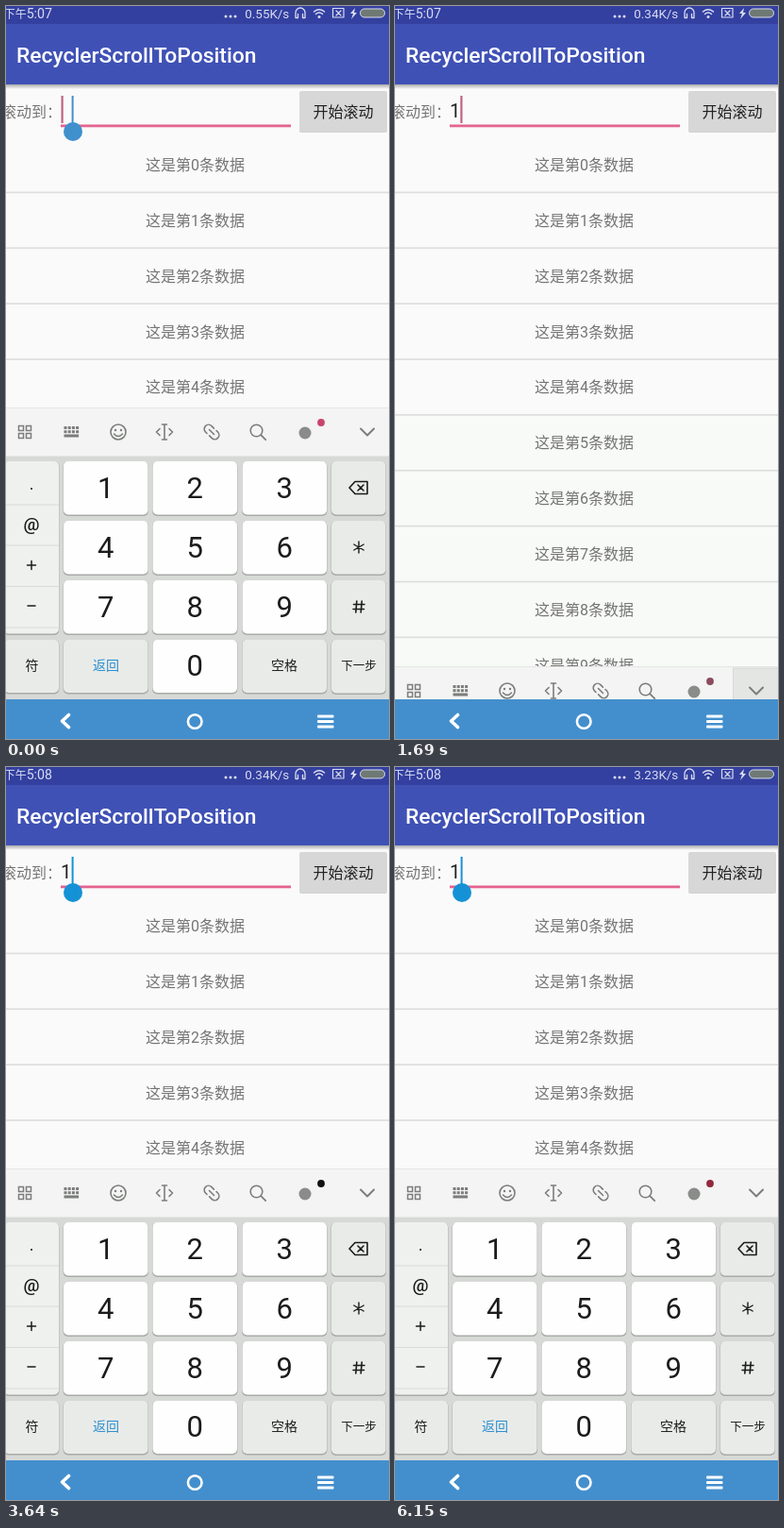
These frames come from a looping animation (406x776 px, 6230 ms). An HTML page:

```html
<!DOCTYPE html>
<html lang="zh">
<head>
<meta charset="utf-8">
<style>
html, body { margin: 0; width: 100%; height: 100%; overflow: hidden; background: #fafafa; }
svg { display: block; width: 406px; height: 776px; font-family: Roboto, 'Noto Sans CJK SC', 'Noto Sans CJK JP', 'Noto Sans CJK', sans-serif; }
.line { fill: none; stroke-linecap: round; stroke-linejoin: round; }
</style>
</head>
<body>
<svg id="stage" viewBox="0 0 406 776"></svg>
<script>
const LOOP = 6230, TYPED = 400, HIDE = 1440, TAP = 3330, KEYBOARD = 309;

const rect = (x, y, w, h, fill, extra = '') =>
  `<rect x="${x}" y="${y}" width="${w}" height="${h}" fill="${fill}" ${extra}/>`;
const text = (x, y, size, fill, s, extra = 'text-anchor="middle"') =>
  `<text x="${x}" y="${y}" font-size="${size}" fill="${fill}" ${extra}>${s}</text>`;
const line = (d, color, width = 1.6, extra = '') =>
  `<path class="line" d="${d}" stroke="${color}" stroke-width="${width}" ${extra}/>`;
const circle = (x, y, r, fill, extra = '') =>
  `<circle cx="${x}" cy="${y}" r="${r}" fill="${fill}" ${extra}/>`;
const range = (n, f) => Array.from({ length: n }, (_, i) => f(i)).join('');

function key(x, y, w, h, fill) {
  return rect(x - 0.4, y + 0.4, w + 0.8, h + 1, '#a9aba9', 'rx="5"') + rect(x, y, w, h, fill, 'rx="5"');
}

function list() {
  return range(10, i =>
    text(200.5, 174 + 58.85 * i, 16, '#757575', `这是第${i}条数据`) +
    rect(0, 196.6 + 58.87 * i, 406, 1.6, '#dcdddc'));
}

function header() {
  const pale = '#d9dcf0';
  return rect(0, 83, 406, 5, 'url(#shade)') +
    rect(0, 0, 406, 19, '#3340a0') + rect(0, 19, 406, 64, '#3f51b5') +
    text(11, 60, 22.85, '#fff', 'RecyclerScrollToPosition', 'font-weight="500"') +
    text(49, 13, 14.2, pale, '<tspan font-size="12">下午</tspan><tspan id="clock"></tspan>', 'text-anchor="end"') +
    range(3, i => circle(233 + 5 * i, 11, 1.5, pale)) +
    text(253.3, 13, 13.4, pale, '', 'id="speed"') +
    line('M309.500 8.500v4h-2.500V7a5 5 0 0 1 10 0v5.500h-2.500v-4', pale, 1.3) +
    line('M326.500 6q5.500-4.500 11 0M328.500 8.500q3.500-2.800 7 0', pale, 1.5) + circle(332, 11.5, 1.5, pale) +
    line('M346.500 2.500H358V12H346.500ZM350 5l5 5M355 5l-5 5', pale, 1.2) +
    `<path d="M370 2l-5 6h3l-2 6 6-7h-3z" fill="${pale}"/>` +
    rect(375.5, 3, 26, 9, '#6f7974', `rx="4.500" stroke="${pale}"`);
}

function form() {
  return text(-5, 118, 16, '#757575', '滚动到：', '') +
    rect(58, 125.5, 244, 2.8, '#e4638f') +
    text(58, 118, 20.3, '#222', '1', 'id="digit"') +
    rect(58.5, 95, 2.2, 29, '#bf6284', 'id="caret"') +
    `<g id="handle">${rect(69.6, 95, 2, 30, 'currentColor')}${circle(71, 133, 10, 'currentColor')}</g>` +
    rect(311, 91.5, 93, 42.5, '#bfc0bf', 'rx="2" opacity=".7"') +
    rect(311, 90, 93, 43, '#d6d7d6', 'id="button" rx="2"') +
    text(357.5, 118, 16, '#212121', '开始滚动');
}

function toolbar() {
  const c = '#7b7d7b';
  return rect(0, 425, 406, 52, '#f3f4f3') + rect(0, 425, 406, 1, '#e5e7e5') +
    rect(358.5, 427, 49, 50, '#e4e6e4', 'id="press" stroke="#d6d8d6"') +
    range(4, i => rect(13.5 + 8 * (i % 2), 444.5 + 8 * (i >> 1), 5, 5, 'none', `stroke="${c}" stroke-width="1.5"`)) +
    range(8, i => rect(61.5 + 4.2 * (i % 4), 445 + 4.2 * (i >> 2), 3, 3, c)) + rect(61.5, 453.5, 15.6, 3, c) +
    circle(119, 451, 8, 'none', `stroke="${c}" stroke-width="1.6"`) +
    circle(116, 449, 1.2, c) + circle(122, 449, 1.2, c) + line('M114.500 453q4.500 5 9 0', c, 1.5) +
    line('M165.500 443h5M168 443v16M165.500 459h5M163 447.500l-3.500 3.500 3.500 3.500M173 447.500l3.500 3.500-3.500 3.500', c) +
    line('M213 452.500l-1.500-1.500a4.500 4.500 0 0 1 6.400-6.400l2.500 2.500M223 449.500l1.500 1.500a4.500 4.500 0 0 1-6.400 6.400l-2.500-2.500M215.500 448.500l5 5', c) +
    circle(265.5, 449.5, 6.3, 'none', `stroke="${c}" stroke-width="1.6"`) + line('M270.200 454.200l5 5', c, 1.8) +
    circle(317, 452, 6.5, '#8a8c8a') + circle(334, 441, 3.9, '#111', 'id="dot"') +
    line('M376 447.500l7 7 7-7', c, 2);
}

function keys() {
  const ink = '#1a1c1a', soft = '#e9ebe9', white = '#fefefe';
  const xs = [61, 155.5, 250.5], rowY = r => 482 + 63 * r;
  let s = rect(0, 476.5, 406, 258, '#d7d9d7') + key(-2, 482, 58, 182.5, '#eff1ef') +
    [527.5, 570.5, 614, 657.5].map(y => rect(0, y, 56, 1, '#d9dbd9')).join('') +
    text(27, 512, 18, ink, '.') + text(27, 555, 19, ink, '@', 'text-anchor="middle" font-weight="500"') +
    line('M22.500 592h9M27 587.500v9M23 635h8', ink, 1.5);
  s += range(9, i => {
    const x = xs[i % 3], y = rowY(Math.floor(i / 3));
    return key(x, y, 89.5, 56.5, white) + text(x + 44.7, y + 38.5, 31, ink, i + 1);
  });
  s += range(4, r => key(345, rowY(r), 57.5, 56.5, soft));
  s += key(-2, 671, 58, 56, soft) + key(61, 671, 89.5, 56, soft) +
    key(155.5, 671, 89.5, 56, white) + key(250.5, 671, 89.5, 56, soft) +
    text(27.5, 703, 14, ink, '符') + text(106, 703, 14, '#2b8fce', '返回') +
    text(200.2, 709, 31, ink, '0') +
    text(295, 703, 14, ink, '空格', 'text-anchor="middle" font-weight="500"') +
    text(374, 703, 12.5, ink, '下一步');
  return s +
    line('M364 510l6-6.500h13v13h-13zM373 507l6 6M379 507l-6 6', ink) +
    line('M374 567v12M368.800 570l10.400 6M379.200 570l-10.400 6', ink, 1.4) +
    line('M371.800 630l-1 12M377.200 630l-1 12M368.500 633.500h11.500M368 638.500h11.500', ink, 1.6);
}

function navBar() {
  return rect(0, 734, 406, 42, '#438fcd') +
    line('M66.500 750.500l-7 6.500 7 6.500', '#fff', 3.6) +
    circle(200.2, 757.5, 7.3, 'none', 'stroke="#fff" stroke-width="2.600"') +
    range(3, i => rect(330, 750.5 + 5.5 * i, 17.5, 3, '#fff', 'rx="1"'));
}

document.getElementById('stage').innerHTML =
  `<defs><linearGradient id="shade" x2="0" y2="1"><stop stop-opacity=".32"/><stop offset="1" stop-opacity="0"/></linearGradient>
   <clipPath id="above"><rect width="406" height="734"/></clipPath>
   <clipPath id="listClip"><rect id="listBox" width="406" height="734"/></clipPath></defs>` +
  rect(0, 0, 406, 776, '#fafafa') + rect(0, 433, 406, 301, '#f8faf7') +
  `<g clip-path="url(#listClip)">${list()}</g>` + header() + form() +
  `<g clip-path="url(#above)"><g id="keyboard">${toolbar()}${keys()}</g></g>` + navBar();

const el = id => document.getElementById(id);
const set = (id, name, value) => el(id).setAttribute(name, value);
const show = (id, on) => set(id, 'visibility', on ? 'visible' : 'hidden');
const latest = (t, steps) => steps.filter(([at]) => at <= t).pop()[1];
const clamp = v => Math.min(1, Math.max(0, v));

function slide(t) {
  const start = t < 3180 ? 1460 : 3180;
  const tick = start + Math.floor((t - start) / 75) * 75;
  return Math.round(KEYBOARD * (t < 3180
    ? clamp((tick - HIDE) / 260) ** 2
    : (1 - clamp((tick - TAP) / 268)) ** 2));
}

function draw() {
  const t = performance.now() % LOOP;
  const typed = t >= TYPED, handle = !typed || t >= TAP;
  set('keyboard', 'transform', `translate(0 ${slide(t)})`);
  set('listBox', 'height', t < HIDE || t >= TAP ? 425 : 734);
  show('press', t >= 1390 && t < 3180);
  show('digit', typed);
  show('handle', handle);
  set('handle', 'color', typed ? '#1592d6' : '#3f90cd');
  show('caret', !typed || (!handle && (t - TYPED) % 1000 < 500));
  set('caret', 'x', typed ? 69.3 : 58.5);
  set('button', 'fill', t >= 2250 && t < 2480 ? '#c8c9c8' : '#d6d7d6');
  set('dot', 'fill', latest(t, [[0, '#c8446a'], [700, '#1c1014'], [1600, '#8c4a5e'],
    [3180, '#111'], [4430, '#33202a'], [5140, '#94283c']]));
  el('clock').textContent = latest(t, [[0, '5:07'], [2860, '5:08']]);
  el('speed').textContent = latest(t, [[0, '0.55K/s'], [1000, '0.34K/s'], [5140, '3.23K/s']]);
  requestAnimationFrame(draw);
}
draw();
</script>
</body>
</html>
```
